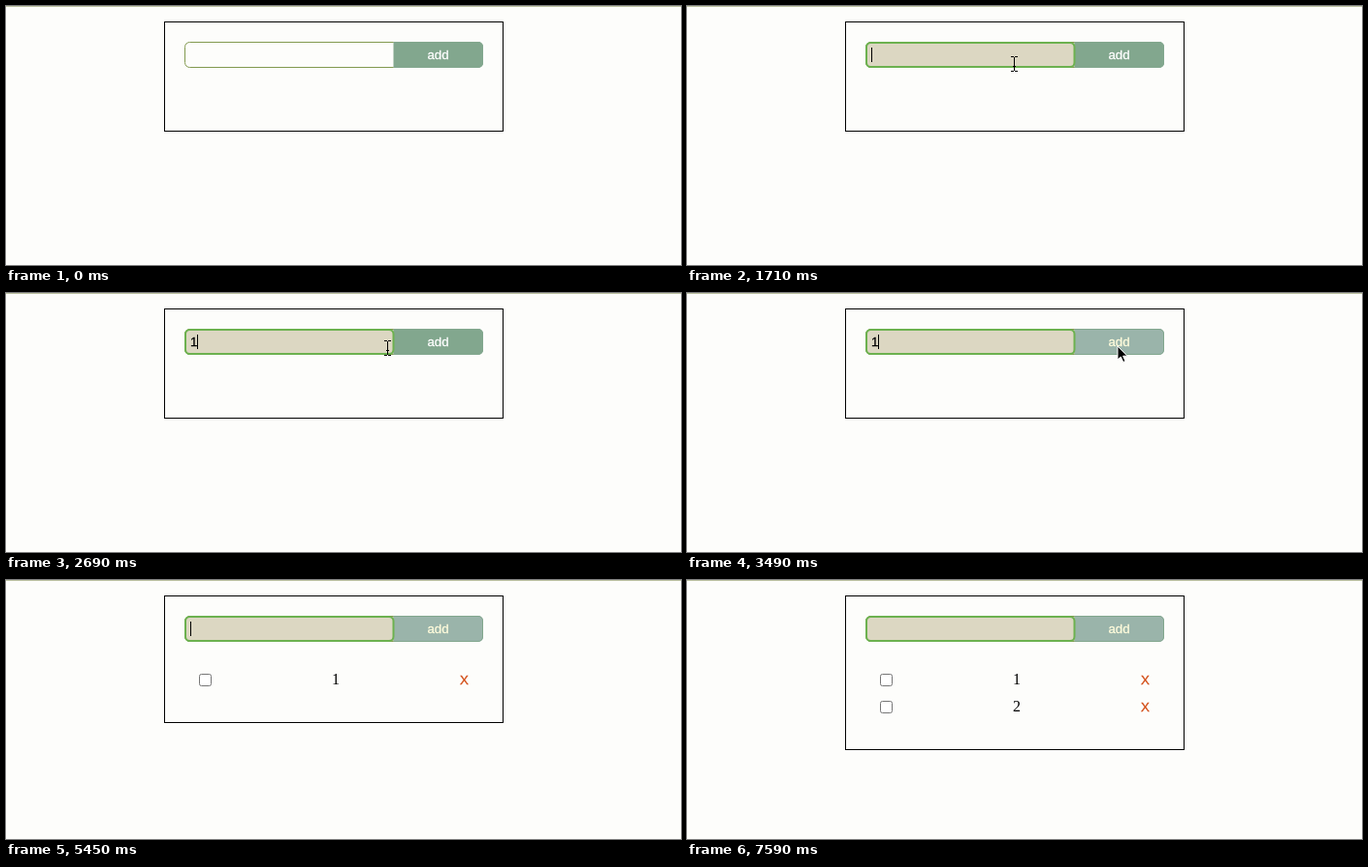
Animation, 696 px wide and 268 px high, one loop 8000 ms. Source, as an HTML page:

```html
<!DOCTYPE html>
<html lang="en">
<head>
<meta charset="utf-8">
<title>List form</title>
<style>
  html, body { margin: 0; width: 100%; height: 100%; overflow: hidden; background: #fdfdfb; }
  svg { display: block; width: 696px; height: 268px; }
  text { white-space: pre; stroke-width: .3px; }
  .sans { font: 13.333px "Liberation Sans", Arial, sans-serif; }
  .serif { font: 16px "Liberation Serif", Times, serif; }
  .middle { text-anchor: middle; }
</style>
</head>
<body>
<svg viewBox="0 0 696 268">
  <defs>
    <g id="row">
      <rect x="199.5" y="97.5" width="12" height="12" rx="2" fill="#fff" stroke="#767676"/>
      <text class="sans middle" x="472.5" y="108" fill="#d24a12" stroke="#d24a12">X</text>
    </g>
  </defs>
  <rect width="696" height="1" fill="#bcc1a2"/>
  <rect id="card" x="163.5" y="16.5" width="349" fill="none" stroke="#000"/>

  <path id="button" d="M399 37H487a5 5 0 0 1 5 5V59a5 5 0 0 1 -5 5H399Z"/>
  <path d="M399.5 37.5H487a4.5 4.5 0 0 1 4.5 4.5V59a4.5 4.5 0 0 1 -4.5 4.5H399.5Z" fill="none" stroke="#82a78e"/>
  <text id="label" class="sans middle" x="445.5" y="55">add</text>

  <path id="field" d="M399.5 37.5H189.5a5 5 0 0 0 -5 5V58.5a5 5 0 0 0 5 5H399.5" stroke="#82994f"/>
  <rect id="ring" x="185" y="38" width="214.5" height="25" rx="4.5" fill="none" stroke="#6cb14f" stroke-width="2"/>
  <text id="value" class="sans" x="190" y="55" stroke="#000"></text>
  <rect id="caret" y="43" width="1" height="15"/>

  <g id="item1"><use href="#row"/><text class="serif middle" x="340" y="108">1</text></g>
  <g id="item2" transform="translate(0 28)"><use href="#row"/><text class="serif middle" x="340" y="108">2</text></g>

  <path id="beam" fill="none" stroke="#000" shape-rendering="crispEdges"
        d="M-3 -7.5H0M1 -7.5H4M-3 7.5H0M1 7.5H4M.5 -7V7M-1 2.5H2"/>
  <path id="arrow" d="M0 0V14L3.3 11L5.8 16.5L8 15.5L5.6 10.2H10Z" stroke="#fff"/>
</svg>
<script>
const LOOP = 8000;
const FOCUS = 1270, TYPE_ONE = 2250, HOVER = 2790, ADD_ONE = 4610, TYPE_TWO = 5690, ADD_TWO = 7050;
const el = id => document.getElementById(id);
const clamp = v => Math.max(0, Math.min(1, v));
const ease = v => v * v * (3 - 2 * v);
const progress = (t, start, length) => ease(clamp((t - start) / length));
const show = (id, on) => el(id).setAttribute('visibility', on ? 'visible' : 'hidden');

function mix(from, to, p) {
  return `rgb(${from.map((c, i) => Math.round(c + (to[i] - c) * p))})`;
}

// Pointer stops: time, x, y
const route = [[20, 362, 270], [730, 338, 63], [870, 337, 61], [1010, 337, 60],
               [2430, 337, 60], [2690, 393, 57], [3010, 444, 55]];

function pointerAt(t) {
  const next = route.findIndex(stop => stop[0] > t);
  if (next < 0) return route[route.length - 1].slice(1);
  const [t0, x0, y0] = route[Math.max(0, next - 1)];
  const [t1, x1, y1] = route[next];
  const p = progress(t, t0, t1 - t0);
  return [Math.round(x0 + (x1 - x0) * p), Math.round(y0 + (y1 - y0) * p)];
}

function caretOn(t) {
  if (t < FOCUS || t >= 7590) return false;
  if (t >= 7090) return true;
  if (t >= TYPE_TWO) return t < TYPE_TWO + 500;
  const start = t < TYPE_ONE ? FOCUS : TYPE_ONE;
  return Math.floor((t - start) / 500) % 2 === 0;
}

function render(t) {
  const items = (t >= ADD_ONE) + (t >= ADD_TWO);
  el('card').setAttribute('height', [113, 131, 159][items]);
  show('item1', items > 0);
  show('item2', items > 1);

  const focus = progress(t, FOCUS, 400);
  el('field').setAttribute('fill', mix([253, 253, 251], [220, 215, 194], focus));
  show('ring', t >= FOCUS);

  const typed = t >= TYPE_ONE && t < ADD_ONE ? '1' : t >= TYPE_TWO && t < ADD_TWO ? '2' : '';
  el('value').textContent = typed;
  el('caret').setAttribute('x', typed ? 197 : 190);
  show('caret', caretOn(t));

  const hover = progress(t, HOVER, 400);
  const labelColor = mix([255, 255, 255], [255, 252, 220], hover);
  el('button').setAttribute('fill', mix([130, 167, 142], [154, 180, 170], hover));
  el('label').setAttribute('fill', labelColor);
  el('label').setAttribute('stroke', labelColor);

  const [x, y] = pointerAt(t);
  const inField = x < 400 && y < 64;
  const visible = t >= 20 && t < ADD_ONE;
  for (const id of ['beam', 'arrow']) el(id).setAttribute('transform', `translate(${x} ${y})`);
  show('beam', visible && inField);
  show('arrow', visible && !inField);
}

const started = performance.now();
function frame() {
  render((performance.now() - started) % LOOP);
  requestAnimationFrame(frame);
}
frame();
</script>
</body>
</html>
```
